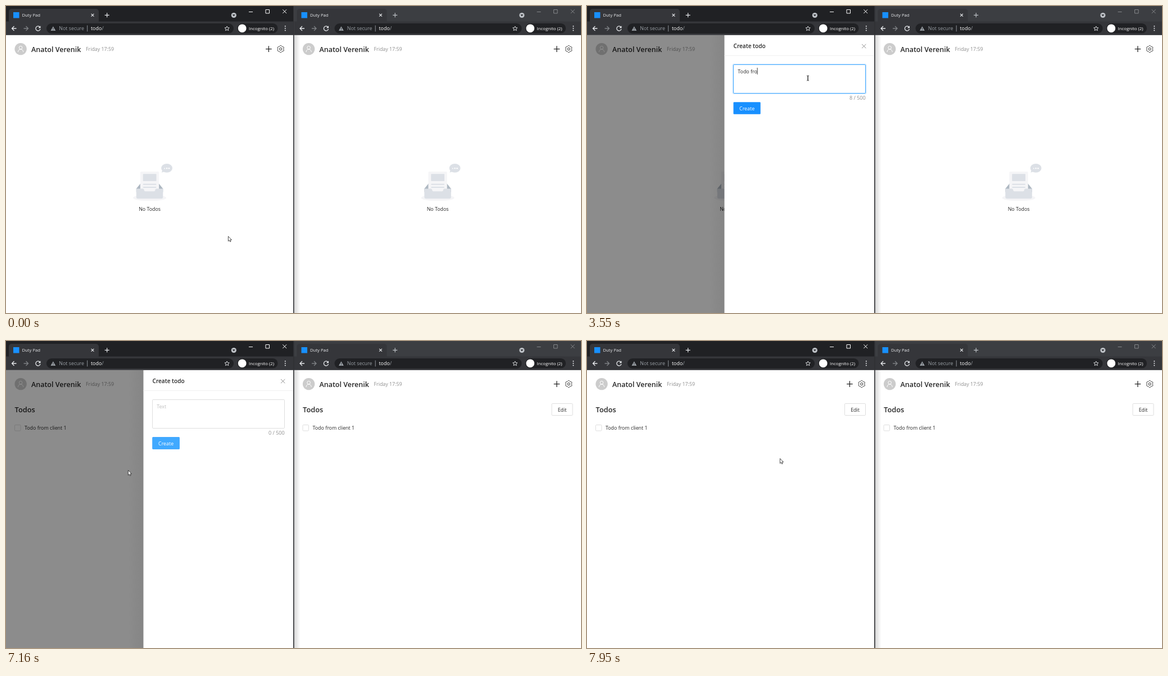
Write an HTML page with a canvas that moves like this. It is 1023 px wide and 547 px high and loops after 8 s.

```html
<!DOCTYPE html>
<html lang="en">
<head>
<meta charset="utf-8">
<title>Two clients, one list</title>
<style>
html, body { margin: 0; width: 100%; height: 100%; overflow: hidden; background: #fff; }
canvas { display: block; }
</style>
</head>
<body>
<canvas id="stage" width="1023" height="547"></canvas>
<script>
const ctx = document.getElementById('stage').getContext('2d');
const LOOP = 8000, EDGE = 511, SECOND = 512.5, DRAWER = 266.5;
const OPEN = 1575, FOCUS = 2340, SUBMIT = 6400, SAVED = 6480, CLOSE = 7615;
const MESSAGE = 'Todo from client 1';
const KEY_TIMES = [2620, 2800, 2900, 3000, 3230, 3360, 3510, 3550, 3750, 3830,
  3980, 4110, 4290, 4440, 4570, 4750, 4900, 5080];
const INK = 'rgba(0,0,0,.85)', MUTED = 'rgba(0,0,0,.45)', BORDER = '#dedede';

// Pointer moves: start, end, target x, target y
const MOVES = [
  [390, 1130, 469, 79], [1760, 2130, 393, 128], [5640, 5980, 293, 181],
  [6750, 7160, 217, 230], [7210, 7400, 201.5, 240], [7830, 7950, 343, 209]
];

const clamp = v => Math.max(0, Math.min(1, v));
const ramp = (t, start, length = 300) => clamp((t - start) / length);
const smooth = p => p * p * (3 - 2 * p);

// cubic-bezier(.7, .3, .1, 1)
function slide(p) {
  let lo = 0, hi = 1, s = p;
  for (let i = 0; i < 24; i++) {
    s = (lo + hi) / 2;
    const x = 2.1 * (1 - s) ** 2 * s + .3 * (1 - s) * s * s + s ** 3;
    if (x < p) lo = s; else hi = s;
  }
  return .9 * (1 - s) ** 2 * s + 3 * (1 - s) * s * s + s ** 3;
}

function text(str, x, y, color = INK, size = 8.85, weight = 400, align = 'left') {
  ctx.font = `${weight} ${size}px "Open Sans", "Noto Sans", sans-serif`;
  ctx.textAlign = align;
  ctx.fillStyle = color;
  ctx.fillText(str, x, y);
}
function fill(d, color) {
  ctx.fillStyle = color;
  ctx.fill(new Path2D(d));
}
function stroke(d, color, width = 1) {
  ctx.strokeStyle = color;
  ctx.lineWidth = width;
  ctx.stroke(new Path2D(d));
}
function paint(color, line) {
  if (color) { ctx.fillStyle = color; ctx.fill(); }
  if (line) { ctx.strokeStyle = line; ctx.lineWidth = 1; ctx.stroke(); }
}
function box(x, y, w, h, r, color, line) {
  ctx.beginPath();
  ctx.roundRect(x, y, w, h, r);
  paint(color, line);
}
function disc(x, y, r, color, line, ry = r) {
  ctx.beginPath();
  ctx.ellipse(x, y, r, ry, 0, 0, 7);
  paint(color, line);
}
const cross = (x, y, r, color, w = 1) =>
  stroke(`M${x - r} ${y - r}l${2 * r} ${2 * r}m0 ${-2 * r}l${-2 * r} ${2 * r}`, color, w);
const plus = (x, y, r, color, w) =>
  stroke(`M${x - r} ${y}h${2 * r}M${x} ${y - r}v${2 * r}`, color, w);
function shade(x0, x1, from, to, y, h) {
  const g = ctx.createLinearGradient(x0, 0, x1, 0);
  g.addColorStop(0, `rgba(0,0,0,${from})`);
  g.addColorStop(1, `rgba(0,0,0,${to})`);
  ctx.fillStyle = g;
  ctx.fillRect(x0, y, x1 - x0, h);
}

function browser(active) {
  const bar = '#35363a', dark = '#202124', light = '#e8eaed', gray = '#9aa0a6';
  const control = active ? '#fff' : '#85878a';
  box(0, 0, EDGE, 28, 0, active ? dark : '#3c3e42');
  box(0, 27.5, EDGE, 23.5, 0, bar);
  box(0, 51, EDGE, 1, 0, '#505155');
  box(5, 5, 160, 26, 5, bar);
  box(13, 11, 10.5, 10.5, 0, '#1890ff');
  text('Duty Pad', 28.5, 19.2, light, 7.7);
  cross(154, 16.2, 2.4, light, 1.2);
  plus(179.7, 16.3, 4, active ? light : '#bdc1c6', 1.2);
  disc(405.3, 16.5, 4.6, '#bdc1c6');
  fill('M402.8 15.2h5l-2.5 3z', dark);
  stroke('M432 10.5h7', control);
  stroke('M462 6.5h6.5v6.5h-6.5z', control);
  cross(495.7, 9.7, 3.4, control);

  stroke('M18.5 40h-8m4-4l-4 4 4 4', light, 1.3);
  stroke('M31.5 40h8m-4-4l4 4-4 4', '#7d8084', 1.3);
  stroke('M60.3 37.6a4.1 4.1 0 1 0 .7 3.3', light, 1.3);
  fill('M61.5 35.2v4h-4z', light);
  box(72, 31, 333, 18, 9, dark);
  fill('M79.5 44l4.4-7.8 4.4 7.8z', gray);
  stroke('M83.9 39v2.4m0 .7v1', dark, .9);
  text('Not secure', 94.3, 43.4, gray);
  stroke('M144.7 34.5v11', gray, .9);
  text('todo', 151, 43.4, '#fff');
  text('/', 170.6, 43.4, gray);
  stroke('M393.2 36l1.2 2.6 2.9.3-2.2 1.9.7 2.9-2.6-1.5-2.6 1.5.7-2.9-2.2-1.9 2.9-.3z', light, .9);
  box(411.5, 31, 72, 17.5, 8.7, dark);
  disc(420.2, 39.8, 7.4, '#fff');
  text('Incognito (2)', 432, 42.6, '#fff', 7.8, 500);
  for (const y of [36, 39.7, 43.4]) disc(496.8, y, 1, light);
}

function gear(x, y) {
  ctx.beginPath();
  for (let a = 0; a < 6.28; a += .1) {
    const r = 5.6 - .6 * Math.cos(6 * a);
    ctx.lineTo(x + r * Math.cos(a), y + r * Math.sin(a));
  }
  ctx.closePath();
  paint(null, '#262626');
  disc(x, y, 2.1, null, '#262626');
}

function emptyState() {
  const tray = '#dce0e6', paper = '#f5f5f7';
  disc(255.6, 341.8, 29.7, paper, null, 5.5);
  fill('M231.8 325.4l10.5-12.9q.8-1 2-1h22.6q1.2 0 2 1l10.4 12.9v6h-47.5z', '#aeb8c2');
  box(238.9, 294.9, 33.3, 42, 1.8, paper);
  box(243.7, 299.3, 23.8, 12.7, .8, tray);
  box(243.7, 316.7, 23.8, 2, 1, tray);
  box(243.7, 321.9, 23.8, 2, 1, tray);
  fill('M231.8 325.4h11.5q2.3 0 2.3 2.4t2.3 2.4h15.3q2.3 0 2.3-2.4t2.3-2.4h11.5v14.7q0 3.2-3 3.2h-41.5q-3 0-3-3.2z', tray);
  disc(286.1, 288.9, 9.9, tray, null, 7.9);
  fill('M278.3 292l-1.4 4.8 5-1.8z', tray);
  fill('M281 290.3h2.4l-1.2-2.2z', '#fff');
  box(285, 288.1, 2.2, 2.2, 0, '#fff');
  disc(290, 289.2, 1.25, '#fff');
  text('No Todos', 255.6, 364.6, INK, 8.85, 400, 'center');
}

function page(hasTodo) {
  box(0, 52, EDGE, 495, 0, '#fff');
  disc(26.1, 76.6, 10.7, '#ccc');
  disc(26.1, 74.2, 2.8, null, '#fff');
  stroke('M21.4 82q.5-4.6 4.7-4.9 4.2.3 4.7 4.9', '#fff');
  text('Anatol Verenik', 45, 81.6, INK, 12.5, 600);
  text('Friday 17:59', 142, 80.4, MUTED);
  plus(467.4, 76.6, 5.3, '#262626', 1.3);
  gear(488.7, 76.6);
  if (!hasTodo) return emptyState();
  text('Todos', 15.6, 127.4, INK, 12.8, 600);
  box(458.5, 111.5, 37, 21, 1.3, '#fff', BORDER);
  text('Edit', 477, 125.8, INK, 8.85, 400, 'center');
  box(15.5, 149.5, 10.5, 10.5, 1.3, '#fff', BORDER);
  text(MESSAGE, 33, 158, INK);
}

function field(t) {
  const blur = 1 - ramp(t, SUBMIT);
  const hover = ramp(t, 1900, 260) * blur;
  const focus = ramp(t, FOCUS, 280) * blur;
  box(260.5, 104.5, 235, 51, 1.3, '#fff', BORDER);
  ctx.globalAlpha = focus * .25;
  box(259.3, 103.3, 237.4, 53.4, 2, null, '#1890ff');
  ctx.globalAlpha = hover;
  box(260.5, 104.5, 235, 51, 1.3, null, '#40a9ff');
  ctx.globalAlpha = 1;

  const count = t < SAVED ? KEY_TIMES.filter(k => k <= t).length : 0;
  const typed = MESSAGE.slice(0, count);
  if (count) text(typed, 268.3, 119.6);
  else text('Text', 268.3, 119.6, '#bfbfbf');
  const lastKey = count ? KEY_TIMES[count - 1] : FOCUS;
  if (t >= FOCUS && t < SUBMIT && Math.floor((t - lastKey) / 530) % 2 === 0) {
    const x = 268.6 + (count ? ctx.measureText(typed).width : 0);
    stroke(`M${x} 110v12`, '#222', .9);
  }
  text(`${count} / 500`, 495.6, 166.6, MUTED, 9, 400, 'right');
}

function drawer(t) {
  const closing = ramp(t, CLOSE);
  if (t < OPEN || closing === 1) return;
  const shown = slide(ramp(t, OPEN));
  const offset = DRAWER * (1 - shown + slide(closing));
  ctx.save();
  ctx.beginPath();
  ctx.rect(0, 52, EDGE, 495);
  ctx.clip();
  box(0, 52, EDGE, 495, 0, `rgba(0,0,0,${.45 * shown * (1 - closing)})`);
  ctx.translate(offset, 0);
  const left = EDGE - DRAWER;
  shade(left - 28, left, 0, .05 * (1 - closing), 52, 495);
  box(left, 52, DRAWER, 495, 0, '#fff');
  text('Create todo', 260.5, 74.8, INK, 10.1, 600);
  cross(492.7, 71.6, 3.6, '#8c8c8c');
  stroke(`M${left} 88.5H${EDGE}`, '#f0f0f0');
  field(t);
  box(260.5, 171.2, 48.2, 21.5, 1.3, '#1890ff');
  ctx.globalAlpha = ramp(t, 5960, 240) * (1 - closing);
  box(260.5, 171.2, 48.2, 21.5, 1.3, '#40a9ff');
  ctx.globalAlpha = 1;
  text('Create', 284.6, 186, '#fff', 8.85, 400, 'center');
  ctx.restore();
}

function pointer(t) {
  let x = 395, y = 410;
  for (const [start, end, tx, ty] of MOVES) {
    const p = smooth(ramp(t, start, end - start));
    x += (tx - x) * p;
    y += (ty - y) * p;
  }
  const over = (l, top, r, b) => x > l && x < r && y > top && y < b;
  const open = t > OPEN && t < CLOSE;
  ctx.save();
  ctx.translate(x, y);
  ctx.lineJoin = 'round';
  if (open && over(260, 104, 496, 156)) {
    stroke('M-2-4q2 0 2 1v7q0 1-2 1m4-9q-2 0-2 1v7q0 1 2 1', '#222', .9);
  } else if (open && over(260, 171, 309, 193) || t < OPEN && over(459, 68, 476, 85)) {
    const hand = 'M-1.2 1q0-1.3 1-1.3t1 1.3v3.6l3.4.8q1.3.4 1.1 2l-.8 4.1h-5l-2.8-4.2q.2-1.3 2.1-.2z';
    fill(hand, '#fff');
    stroke(hand, '#111', .8);
  } else {
    const arrow = 'M.4.4v8.7l2-1.8 1.3 2.8 1.4-.6-1.2-2.8h2.6z';
    fill(arrow, '#fff');
    stroke(arrow, '#222', .8);
  }
  ctx.restore();
}

function draw(t) {
  const saved = t >= SAVED;
  ctx.save();
  ctx.translate(SECOND, 0);
  browser(false);
  page(saved);
  ctx.restore();
  shade(SECOND, SECOND + 11, .16, 0, 52, 495);
  browser(true);
  page(saved);
  drawer(t);
  box(EDGE, 0, 1.5, 547, 0, '#303134');
  pointer(t);
}

const begin = performance.now();
function tick() {
  draw((performance.now() - begin) % LOOP);
  requestAnimationFrame(tick);
}
tick();
</script>
</body>
</html>
```
